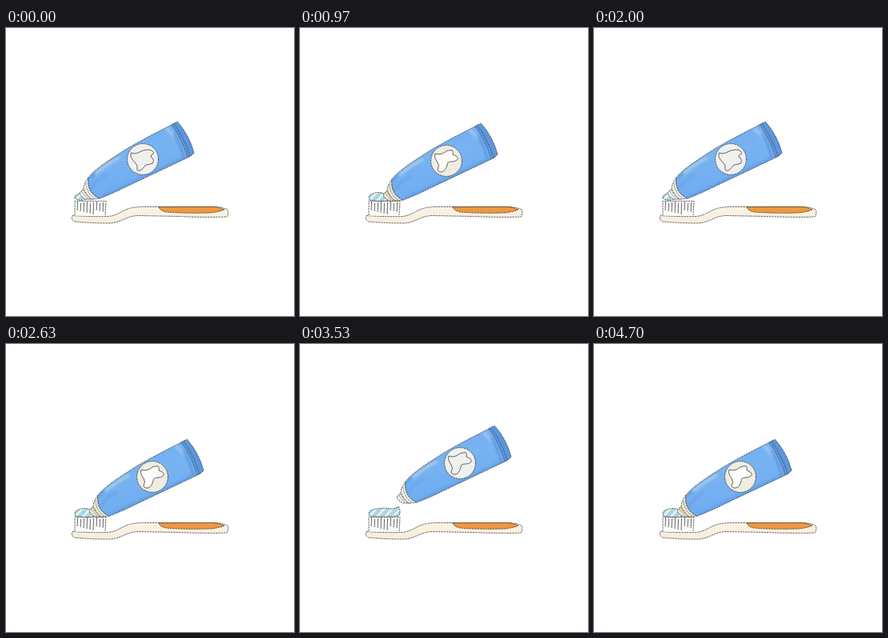
Recreate the animation shown at these times as an HTML page. Size 360 by 360 pixels, loop 5010 ms.

```html
<!DOCTYPE html>
<html lang="en">
<head>
<meta charset="utf-8">
<title>Toothpaste</title>
<style>
  html, body { margin: 0; width: 100%; height: 100%; overflow: hidden; background: #fff; }
  svg { display: block; width: 100vw; height: 100vh; }
  .ink { fill: none; stroke: #25282c; stroke-width: .7; stroke-dasharray: 2.4 .9; stroke-linejoin: round; }
  .thin { stroke-width: .5; }
  .solid { stroke-dasharray: none; }
</style>
</head>
<body>
<svg viewBox="0 0 360 360">
  <defs>
    <linearGradient id="blue" x1="0" y1="0" x2=".35" y2="1">
      <stop offset="0" stop-color="#6caaec"/>
      <stop offset=".5" stop-color="#78b3f2"/>
      <stop offset="1" stop-color="#6dabef"/>
    </linearGradient>
    <linearGradient id="cream" x1="0" y1="0" x2="0" y2="1">
      <stop offset="0" stop-color="#faf3e4"/>
      <stop offset="1" stop-color="#f8eddb"/>
    </linearGradient>
    <pattern id="stripes" width="10" height="12" patternUnits="userSpaceOnUse" patternTransform="translate(88 205) skewX(-42)">
      <rect width="10" height="12" fill="#e6f3f4"/>
      <rect width="5.6" height="12" fill="#a9d9e5"/>
      <rect x="5.4" width=".5" height="12" fill="#7fa9b5"/>
    </pattern>
    <filter id="soft" x="-50%" y="-50%" width="200%" height="200%"><feGaussianBlur stdDeviation="1.8"/></filter>
    <path id="body" d="M36-43Q40-46 43.5-46.5Q58-30 64-8Q61-4 56-2L-20 34Q-38 43-54 49Q-70 42-68 23Q-61 13-31-6Q-12-19 36-43Z"/>
    <clipPath id="inside"><use href="#body"/></clipPath>
  </defs>

  <g id="brush">
    <path class="ink" style="fill:url(#cream)" d="M83 234.5Q104 236 128 235.5C140 234 143 229 154 225.5Q163 223 180 223.5L262 223.5Q271 224 277 227Q279 232 276 236Q250 237 215 235.5L165 234.5C150 235 145 243 130 244Q107 244 86 242Q81 240 83 234.5Z"/>
    <path class="ink" style="fill:#ee983f" d="M191 223.7L260 223.5Q268 224.5 273 227Q266 230 255 231Q225 232 200 230Q192 228 191 223.7Z"/>
    <path fill="#fbfbf9" d="M86 216H125L124 234.5H86Z"/>
    <path class="ink" d="M86 234V216.3H125L124 234"/>
    <path id="bristles" class="ink solid"/>
  </g>

  <path id="paste" class="ink" style="fill:url(#stripes)"/>

  <g id="tube">
    <path id="neck" class="ink" d="M-73 36L-79 42Q-78 47-71 50L-62 50Z"/>
    <path class="ink thin" d="M-77 40L-68 50M-75.5 38L-65 50"/>
    <path id="shoulder" class="ink" d="M-68 23Q-73 29-74 36Q-71 45-64 50L-54 49Q-70 42-68 23Z"/>
    <path class="ink thin" d="M-71 30Q-70 43-60 49"/>
    <use href="#body" fill="url(#blue)"/>
    <g clip-path="url(#inside)">
      <path d="M36-43Q49-25 56-2L68-5L46-50Z" fill="#5c97dd"/>
      <g filter="url(#soft)" fill="none" stroke-linecap="round">
        <path d="M-66 24Q-52 8-30-4" stroke="#5c8fc4" stroke-width="1.6"/>
        <path d="M-58 17Q-45 6-30-2" stroke="#b9d9ea" stroke-width="3.5" opacity=".8"/>
        <path d="M30-38L39-29" stroke="#a9d0f6" stroke-width="5" opacity=".6"/>
        <path d="M-51 47L54-3" stroke="#5b98e2" stroke-width="2.4"/>
        <path d="M-64 36Q-58 26-46 20" stroke="#649fe2" stroke-width="4" opacity=".6"/>
        <path d="M39-32Q47-20 51-3" stroke="#5c93d6" stroke-width="2.5"/>
      </g>
    </g>
    <use href="#body" class="ink"/>
    <path class="ink thin" d="M36-43Q49-25 56-2M39-44Q52-26 59-4"/>
    <circle id="label" class="ink" r="19.4"/>
    <path id="tooth" class="ink solid"/>
  </g>
</svg>
<script>
const $ = id => document.getElementById(id);
const LOOP = 5010, HOLD = 500;

const tooth = 'M-14-9Q-10-7-5-9Q1-14 7-13.5Q9-12 8-8Q14-6 14.5-3Q13 1 6 1Q1 1 1 5Q-1 13-6 14Q-11 14-11 11Q-8 6-11 2Q-16-5-14-9Z';
const poses = [
  { x: 171, y: 164, label: '#f0f0ee', tooth: '#f0f0ee', neck: '#efefec',
    mark: 'M-14.5-8Q-10-6-6-8Q0-12 7-12Q14-11 13.5-7Q9-5 10-3Q15 0 12.5 5Q8 7 4 7Q1 11-3 14Q-8 15-7 11Q-6 7-10 4Q-17-3-14.5-8Z',
    paste: 'M86 213Q86 208 90 208Q92 205 96 206L100 214Q93 217 86 213Z' },
  { x: 183, y: 166, label: '#f0ece0', tooth: '#fdfdfb', neck: '#ece6d1', mark: tooth,
    paste: 'M87 215Q84 209 91 207Q99 204 105 207L110 216Q97 217 87 215Z' },
  { x: 191.5, y: 165.5, label: '#f0f0ee', tooth: '#f0f0ee', neck: '#eeeee6', mark: tooth,
    paste: 'M87 215Q84 209 91 207Q103 204 112 206L119 215Q101 217 87 215Z' },
  { x: 200, y: 149, label: '#f0f0ee', tooth: '#f0f0ee', neck: '#eeeee6', mark: tooth,
    paste: 'M87 215Q84 209 91 207Q104 204 114 206Q119 206 123 203Q127 211 123 215Q102 217 87 215Z' }
];

// Bristle strokes of slightly uneven length
let strokes = '';
for (let i = 0; i < 9; i++) {
  const x = 89.5 + i * 4, top = 217 + i * 5 % 3, end = 228 + i * 7 % 6;
  strokes += `M${x} ${top}L${x - .4} ${end}`;
}
$('bristles').setAttribute('d', strokes);

let shown = -1;
function draw(now) {
  const step = Math.min(9, Math.floor(now % LOOP / HOLD)) % poses.length;
  if (step !== shown) {
    const p = poses[shown = step];
    $('tube').setAttribute('transform', `translate(${p.x} ${p.y})`);
    $('paste').setAttribute('d', p.paste);
    $('tooth').setAttribute('d', p.mark);
    $('label').style.fill = p.label;
    $('tooth').style.fill = p.tooth;
    $('neck').style.fill = $('shoulder').style.fill = p.neck;
  }
  requestAnimationFrame(draw);
}
draw(performance.now());
</script>
</body>
</html>
```
